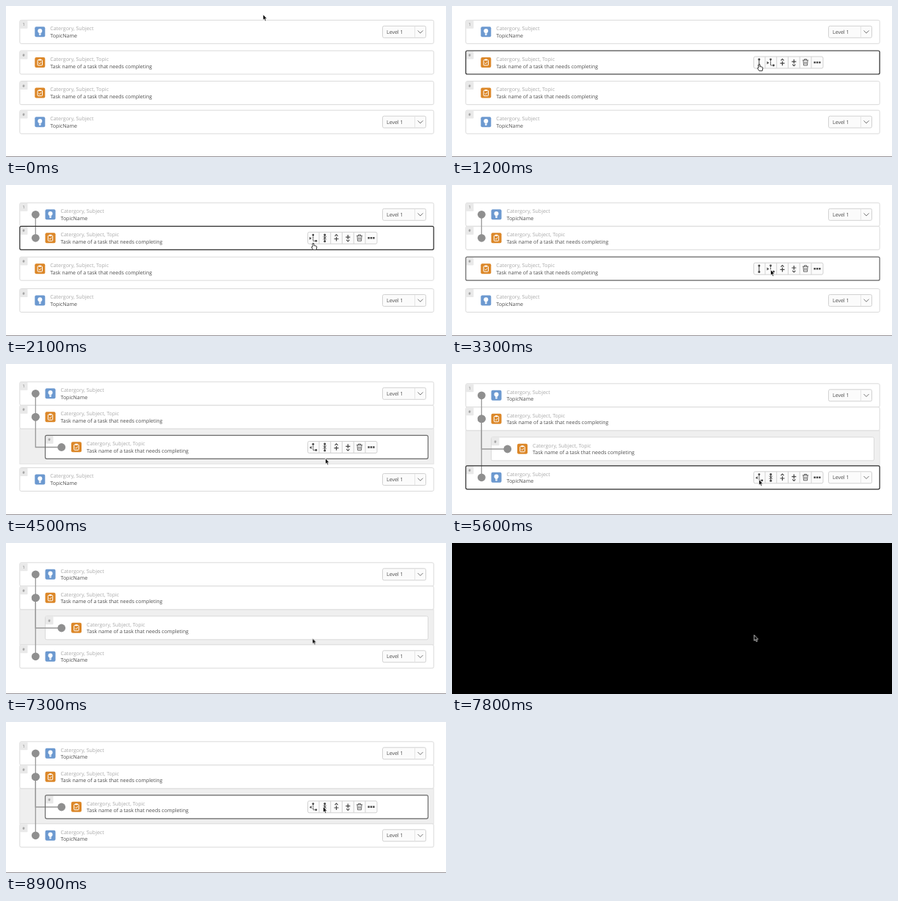
An HTML page that plays this animation: 600 px wide and 206 px high, repeating every 9000 ms.

```html
<!DOCTYPE html>
<html lang="en">
<head>
<meta charset="utf-8">
<title>Linking task cards</title>
<style>
html, body { margin: 0; width: 100%; height: 100%; overflow: hidden; background: #fff; }
svg { display: block; width: 600px; height: 206px; }
text { font: 7px "Open Sans", sans-serif; fill: #4c4c4c; text-rendering: geometricPrecision; }
.cat { fill: #a9a9a9; }
.tag { font-size: 5.5px; fill: #777; text-anchor: middle; }
.frame { fill: #fff; stroke: #dadada; }
.box { fill: #fbfbfb; stroke: #d2d2d2; }
.focus { fill: none; stroke: #6e6e6e; stroke-width: 1.2; }
.dark { stroke: #333; }
.wire { fill: none; stroke: #999; stroke-width: 1.3; }
.dot { fill: #8f8f8f; }
.line { fill: none; stroke: #444; }

/* Everything below shares one 9 s clock */
.show { visibility: hidden; animation: 9s step-end infinite; }
.apart { animation-name: apart; }
.pair { animation-name: pair; }
.nested { animation-name: nested; }
.joined { animation-name: joined; }
.over-2a { animation-name: over-2a; }
.over-2b { animation-name: over-2b; }
.over-3a { animation-name: over-3a; }
.over-3b { animation-name: over-3b; }
.over-4a { animation-name: over-4a; }
.over-4b { animation-name: over-4b; }
.over-3c { animation-name: over-3c; }
.blackout { animation-name: blackout; }
.hand { animation-name: hand; }
.arrow { animation-name: arrow; }
@keyframes apart { 0% { visibility: visible } 23.333% { visibility: hidden } }
@keyframes pair { 23.333% { visibility: visible } 42.222% { visibility: hidden } }
@keyframes nested { 42.222% { visibility: visible } 61.111% { visibility: hidden } }
@keyframes joined { 61.111% { visibility: visible } 100% { visibility: visible } }
@keyframes over-2a { 7.777% { visibility: visible } 23.333% { visibility: hidden } }
@keyframes over-2b { 23.333% { visibility: visible } 26.666% { visibility: hidden } }
@keyframes over-3a { 28.888% { visibility: visible } 42.222% { visibility: hidden } }
@keyframes over-3b { 42.222% { visibility: visible } 51.111% { visibility: hidden } }
@keyframes over-4a { 51.111% { visibility: visible } 61.111% { visibility: hidden } }
@keyframes over-4b { 61.111% { visibility: visible } 66.666% { visibility: hidden } }
@keyframes over-3c { 87.777% { visibility: visible } 100% { visibility: visible } }
@keyframes blackout {
  51.111%, 86.666% { visibility: visible }
  52.222%, 87.777% { visibility: hidden }
}
@keyframes hand { 10% { visibility: visible } 24.444% { visibility: hidden } }
@keyframes arrow { 0%, 24.444% { visibility: visible } 10% { visibility: hidden } 100% { visibility: visible } }

.cursor { animation: roam 9s linear infinite; }
@keyframes roam {
  0% { transform: translate(350px, 11px); animation-timing-function: ease-in-out }
  10% { transform: translate(419px, 79px) }
  23.333% { transform: translate(419px, 79px); animation-timing-function: ease-in-out }
  32.222%, 48.888% { transform: translate(434px, 115px) }
  50% { transform: translate(435px, 128px) }
  52.222%, 54.444% { transform: translate(434px, 156px) }
  57.777%, 62.222% { transform: translate(418px, 157px) }
  68.888%, 72.222% { transform: translate(424px, 134px) }
  74.444%, 76.666% { transform: translate(422px, 133px) }
  86.666%, 87.777% { transform: translate(411.5px, 125px) }
  94.444%, 95.555% { transform: translate(420px, 115.5px) }
  98.888%, 100% { transform: translate(432px, 115px) }
}
</style>
</head>
<body>
<svg viewBox="0 0 600 206">
  <defs>
    <!-- Cards: y = 0 is the middle of the row -->
    <rect id="card" class="frame" x="18.8" y="-16" width="564.4" height="32" rx="2"/>
    <rect id="inner" class="frame" x="53.5" y="-16" width="522" height="32" rx="2"/>
    <rect id="tag" x="19" y="-15.6" width="10.5" height="11" rx="1" fill="#e9e9e9"/>
    <g id="first"><use href="#card"/><use href="#tag"/><text class="tag" x="24" y="-8">1</text></g>
    <g id="hash"><use href="#tag"/><text class="tag" x="24" y="-8">#</text></g>
    <g id="next"><use href="#card"/><use href="#hash"/></g>

    <!-- Row contents: origin is the middle of the icon -->
    <g id="topic">
      <rect x="-7" y="-7" width="14" height="14" rx="2" fill="#6c99d0"/>
      <circle cy="-1.2" r="3" fill="#fff"/>
      <path d="M-1.4 1H1.4V4L.6 4.8H-.6L-1.4 4Z" fill="#fff"/>
      <path d="M-1.4 2.6H1.4" stroke="#6c99d0" stroke-width=".5"/>
      <text class="cat" x="14" y="-2.2">Catergory, Subject</text>
      <text x="14" y="7.6">TopicName</text>
    </g>
    <g id="task">
      <rect x="-7" y="-7" width="14" height="14" rx="2" fill="#dc8728"/>
      <rect x="-3.2" y="-3.4" width="6.4" height="7.4" rx=".8" fill="none" stroke="#fff"/>
      <rect x="-1.6" y="-4.6" width="3.2" height="2" fill="#fff"/>
      <path d="M-1.6 .6L-.4 1.9L1.7 -.8" fill="none" stroke="#fff" stroke-width=".9"/>
      <text class="cat" x="14" y="-2.2">Catergory, Subject, Topic</text>
      <text x="14" y="7.6">Task name of a task that needs completing</text>
    </g>
    <g id="level">
      <rect class="box" x="513.5" y="-8" width="59" height="16" rx="2"/>
      <path d="M557.5 -7.5V7.5" stroke="#e6e6e6"/>
      <text x="519" y="2.6">Level 1</text>
      <path d="M561.5 -1.8L565 1.8L568.5 -1.8" fill="none" stroke="#777"/>
    </g>
    <circle id="dot" class="dot" r="5.4"/>

    <!-- Toolbar icons -->
    <g id="link" fill="#444">
      <path class="line" d="M0 -4V4"/><circle cy="-4.2" r="1.5"/><circle cy="4.2" r="1.5"/>
    </g>
    <g id="branch" fill="#444">
      <path class="line" d="M0 -4V4H4" stroke-dasharray="2 .6"/>
      <circle cy="-4.2" r="1.4"/><circle cx="4" cy="4" r="1.4"/>
    </g>
    <g id="indent"><use href="#branch"/><path d="M-5 -1.6L-2.2 .4L-5 2.4Z" fill="#444"/></g>
    <g id="outdent"><use href="#branch"/><path d="M-2.2 -1.6L-5 .4L-2.2 2.4Z" fill="#444"/></g>
    <g id="unlink" fill="#444">
      <circle cy="-4.4" r="1.5"/><circle cy="4.4" r="1.5"/>
      <path class="line" d="M-2 -2L2 2M2 -2L-2 2M0 -4V4"/>
    </g>
    <g id="up"><path class="line" d="M-2 -2.6L0 -4.6L2 -2.6M-3 1.2H3M0 -1.6V4.2" stroke-width="1.2"/></g>
    <g id="more">
      <rect class="box" x="411.5" y="-8" width="94.5" height="16" rx="2"/>
      <path d="M427 -8V8M442.7 -8V8M458.4 -8V8M474.2 -8V8M490 -8V8" stroke="#d2d2d2"/>
      <use href="#up" x="450.5"/>
      <use href="#up" transform="translate(466.3) scale(1 -1)"/>
      <path class="line" d="M478 -3H486M480.5 -3V-4.4H483.5V-3M479 -3L479.5 4H484.5L485 -3M481 -1V2.5M483 -1V2.5" stroke-width=".8"/>
      <path d="M493.4 -1.2h2.4v2.4h-2.4zM496.8 -1.2h2.4v2.4h-2.4zM500.2 -1.2h2.4v2.4h-2.4z" fill="#444"/>
    </g>
    <g id="loose-bar"><use href="#more"/><use href="#link" x="418.8"/><use href="#indent" x="434.5"/></g>
    <g id="indent-bar"><use href="#more"/><use href="#indent" x="418.8"/><use href="#unlink" x="434.7"/></g>
    <g id="outdent-bar"><use href="#more"/><use href="#outdent" x="418.8"/><use href="#unlink" x="434.7"/></g>
    <rect id="ring" x="18.8" y="-16" width="564.4" height="32" rx="2"/>
    <rect id="inner-ring" x="53.5" y="-16" width="522" height="32" rx="2"/>

    <!-- Linked groups -->
    <g id="duo">
      <use href="#first"/><use href="#next" y="32"/>
      <path class="wire" d="M40.3 0V32"/>
      <use href="#dot" x="40.3"/><use href="#dot" x="40.3" y="32"/>
      <use href="#topic" x="60.5"/><use href="#level"/>
      <use href="#task" x="60.5" y="32"/>
    </g>
    <g id="branching">
      <rect x="18.8" y="48" width="564.4" height="48" fill="#efefef" stroke="#e4e4e4"/>
      <use href="#duo"/>
      <use href="#inner" y="73"/><use href="#hash" x="35" y="73"/>
      <path class="wire" d="M40.3 32V73.2H75.5"/>
      <use href="#dot" x="40.3" y="32"/><use href="#dot" x="75.7" y="73.2"/>
      <use href="#task" x="96" y="73"/>
    </g>
    <g id="loose-topic"><use href="#next"/><use href="#topic" x="46.3"/><use href="#level"/></g>
    <g id="loose-task"><use href="#next"/><use href="#task" x="46.3"/></g>
  </defs>

  <rect width="600" height="206" fill="#fff"/>
  <rect y="205" width="600" height="1" fill="#989498"/>

  <g class="show apart">
    <use href="#first" y="35.3"/><use href="#topic" x="46.3" y="35.3"/><use href="#level" y="35.3"/>
    <use href="#loose-task" y="77"/>
    <use href="#loose-task" y="118.6"/>
    <use href="#loose-topic" y="158.2"/>
  </g>
  <g class="show pair">
    <use href="#duo" y="40.3"/>
    <use href="#loose-task" y="114.2"/>
    <use href="#loose-topic" y="157.5"/>
  </g>
  <g class="show nested">
    <use href="#branching" y="40.3"/>
    <use href="#loose-topic" y="157.5"/>
  </g>
  <g class="show joined">
    <use href="#branching" y="42.8"/>
    <use href="#next" y="154.8"/>
    <path class="wire" d="M40.3 74.8V154.8"/>
    <use href="#dot" x="40.3" y="74.8"/><use href="#dot" x="40.3" y="154.8"/>
    <use href="#topic" x="60.5" y="154.8"/><use href="#level" y="154.8"/>
  </g>

  <g class="show over-2a"><use class="focus dark" href="#ring" y="77"/><use href="#loose-bar" y="77"/></g>
  <g class="show over-2b"><use class="focus dark" href="#ring" y="72.3"/><use href="#indent-bar" y="72.3"/></g>
  <g class="show over-3a"><use class="focus" href="#ring" y="114.2"/><use href="#loose-bar" y="114.2"/></g>
  <g class="show over-3b"><use class="focus" href="#inner-ring" y="113.3"/><use href="#outdent-bar" y="113.5"/></g>
  <g class="show over-4a"><use class="focus" href="#ring" y="157.5"/><use href="#loose-bar" y="157.5"/></g>
  <g class="show over-4b"><use class="focus dark" href="#ring" y="154.8"/><use href="#outdent-bar" y="154.8"/></g>
  <g class="show over-3c"><use class="focus" href="#inner-ring" y="115.8"/><use href="#outdent-bar" y="115.8"/></g>

  <rect class="show blackout" width="600" height="206"/>

  <g class="cursor">
    <path class="show arrow" d="M.5 .5V8.2L2.2 6.7L3.5 9.6L4.8 9L3.6 6.2H5.8Z" fill="#000" stroke="#fff" stroke-width=".7"/>
    <path class="show hand" d="M-1 .8Q0 -.3 .9 .8V3.6L4 4.2Q5 4.6 4.8 6L4.2 9.4H-.2L-2.4 6.2Q-2.6 5 -1 5.6Z" fill="#fff" stroke="#222" stroke-width=".9"/>
  </g>
</svg>
</body>
</html>
```
